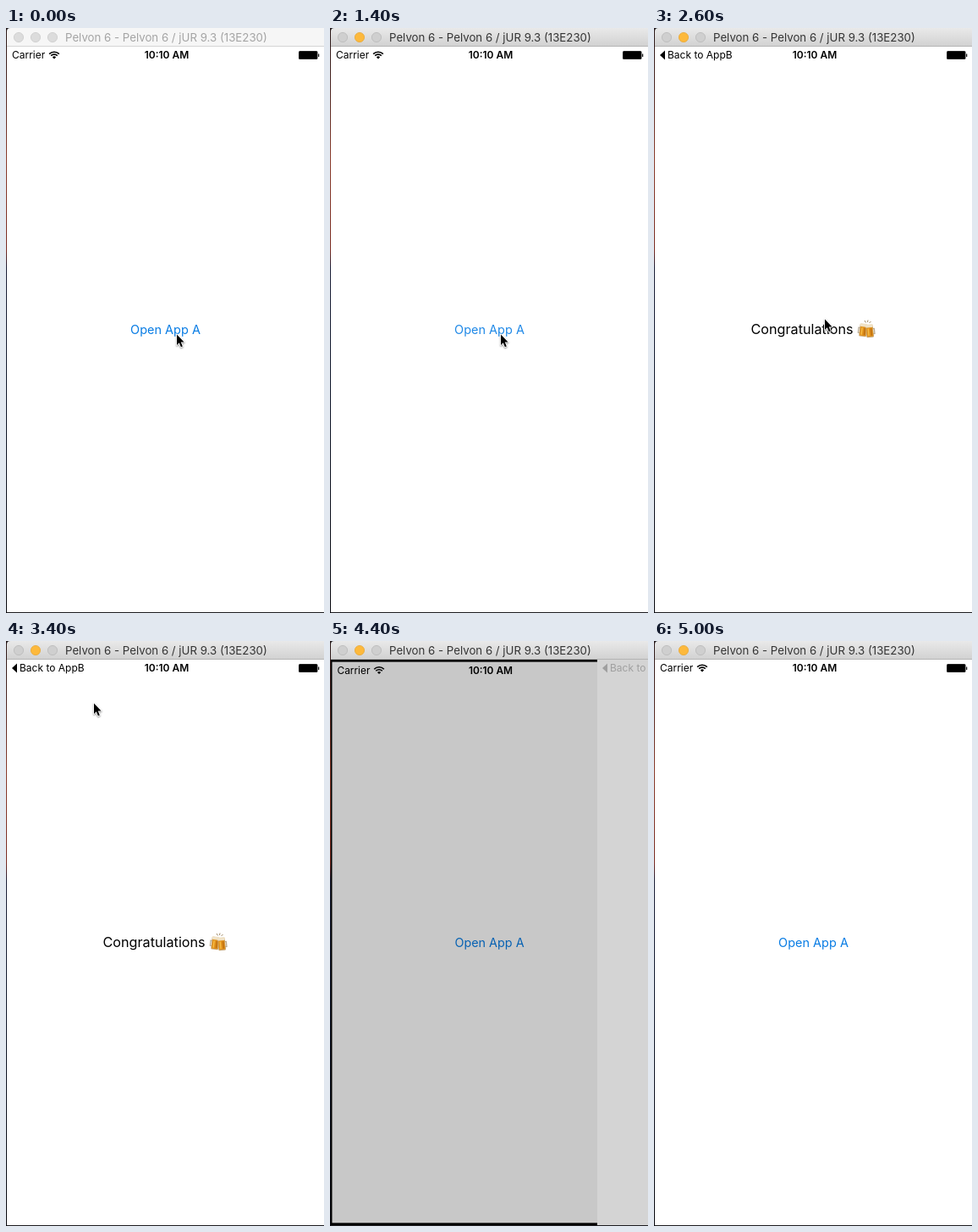
An HTML page with a canvas that plays this animation: 376x690 px, repeating every 5100 ms.

```html
<!DOCTYPE html>
<html lang="en">
<head>
<meta charset="utf-8">
<title>App switch</title>
<style>
  html, body { margin: 0; width: 100%; height: 100%; overflow: hidden; background: #fff; }
  canvas { display: block; width: 376px; height: 690px; }
</style>
</head>
<body>
<canvas id="stage" width="376" height="690"></canvas>
<script>
const ctx = document.getElementById('stage').getContext('2d');
const LOOP = 5100, STEP = 100;
const SCREEN = { x: 1, y: 22, w: 375, h: 667 };
const BLUE = '#087ce4';

// Pointer tip: time, x, y
const POINTER_PATH = [
  [2500, 202, 360], [2600, 202, 342], [2850, 190, 230],
  [3100, 160, 133], [3400, 104, 72], [3700, 48, 35]
];

const clamp = v => Math.max(0, Math.min(1, v));
const mix = (a, b, k) => a + (b - a) * k;

// Share of the way still to go in a critically damped spring
const springLeft = ms => {
  const wt = ms / 1000 * 18.3;
  return (1 + wt) * Math.exp(-wt);
};

function rect(x, y, w, h, color) {
  ctx.fillStyle = color;
  ctx.fillRect(x, y, w, h);
}

function fillScreen(color) {
  rect(SCREEN.x, SCREEN.y, SCREEN.w, SCREEN.h, color);
}

function text(str, x, y, size, color, weight = 400, align = 'left') {
  ctx.font = `${weight} ${size}px Inter, "Open Sans", sans-serif`;
  ctx.textAlign = align;
  ctx.fillStyle = color;
  ctx.fillText(str, x, y);
}

function polygon(points, color) {
  ctx.beginPath();
  points.forEach(([x, y]) => ctx.lineTo(x, y));
  ctx.closePath();
  ctx.fillStyle = color;
  ctx.fill();
}

function roundBox(x, y, w, h, r, color) {
  ctx.beginPath();
  ctx.roundRect(x, y, w, h, r);
  ctx.fillStyle = color;
  ctx.fill();
}

function withAlpha(alpha, draw) {
  ctx.save();
  ctx.globalAlpha = alpha;
  draw();
  ctx.restore();
}

function desktop() {
  const g = ctx.createLinearGradient(0, 0, 0, 690);
  [[0, '#2a1a1a'], [.1, '#4a2420'], [.22, '#8a3c2c'], [.38, '#7a2c22'],
   [.41, '#1c2038'], [.6, '#10182c'], [1, '#08080e']].forEach(s => g.addColorStop(...s));
  rect(0, 0, 376, 690, '#1c1c20');
  rect(0, 0, 1, 690, g);
}

function titleBar(active) {
  let fill = '#f6f6f6';
  if (active) {
    fill = ctx.createLinearGradient(0, 0, 0, 21);
    fill.addColorStop(0, '#e9e9e9');
    fill.addColorStop(1, '#d2d2d2');
  }
  roundBox(1, 0, 380, 22, [4, 0, 0, 0], fill);
  rect(1, 21, 375, 1, active ? '#b4b4b4' : '#d4d4d4');

  [15, 35, 55].forEach((x, i) => {
    const lit = active && i === 1;
    ctx.beginPath();
    ctx.arc(x, 11, 5.6, 0, 7);
    ctx.fillStyle = lit ? '#fdb93c' : active ? '#cfcfcf' : '#dcdcdc';
    ctx.fill();
    ctx.lineWidth = .8;
    ctx.strokeStyle = lit ? '#e8a835' : active ? '#b9b9b9' : '#cbcbcb';
    ctx.stroke();
  });
  text('Pelvon 6 - Pelvon 6 / jUR 9.3 (13E230)', 70, 16, 13.25, active ? '#343434' : '#a4a4a4');
}

function wifi(x, y) {
  ctx.strokeStyle = '#000';
  ctx.lineWidth = 1.6;
  [8.3, 5.4].forEach(r => {
    ctx.beginPath();
    ctx.arc(x, y, r, -Math.PI * .75, -Math.PI * .25);
    ctx.stroke();
  });
  ctx.beginPath();
  ctx.moveTo(x, y);
  ctx.arc(x, y, 3, -Math.PI * .75, -Math.PI * .25);
  ctx.fillStyle = '#000';
  ctx.fill();
}

function battery() {
  roundBox(346, 27, 22.5, 10, 1.5, '#222');
  rect(347, 28, 20.5, 8, '#000');
  rect(369, 30.5, 1.3, 3.5, '#222');
}

function mug(x, y, tilt, side) {
  ctx.save();
  ctx.translate(x, y);
  ctx.rotate(tilt);
  ctx.strokeStyle = '#b9ab94';
  ctx.lineWidth = 1.3;
  ctx.strokeRect(side < 0 ? -5.6 : 3, -2, 2.6, 6);
  roundBox(-4.4, -7, 8.8, 15, 1.3, '#c9a878');
  rect(-3.6, -4, 7.2, 11, '#e0901a');
  rect(-2.2, -2.5, 1.3, 8.5, '#f8bf48');
  rect(1.2, -2.5, 1.3, 8.5, '#b96a10');
  roundBox(-4.5, -7.5, 9, 3.8, 1.6, '#f0e2c6');
  ctx.restore();
}

function beers() {
  mug(247.4, 356, .12, -1);
  mug(255, 357, -.1, 1);
  ctx.strokeStyle = '#a08a66';
  ctx.lineWidth = 1;
  ctx.beginPath();
  [[250.5, 347.5, 249, 345], [252.5, 347, 253, 344.5], [254.5, 348, 256.5, 346]].forEach(([a, b, c, d]) => {
    ctx.moveTo(a, b);
    ctx.lineTo(c, d);
  });
  ctx.stroke();
}

function page() {
  fillScreen('#fff');
  text('10:10 AM', 190, 36, 12, '#000', 600, 'center');
  battery();
}

function launcher(buttonAlpha) {
  page();
  text('Carrier', 7, 36, 12, '#000');
  wifi(57, 36.5);
  withAlpha(buttonAlpha, () => text('Open App A', 188.5, 361, 14.5, BLUE, 400, 'center'));
}

function greeting(backAlpha, bodyAlpha) {
  page();
  withAlpha(backAlpha, () => {
    polygon([[7, 32], [13, 26.5], [13, 37.5]], '#000');
    text('Back to AppB', 16, 36, 12, '#000');
  });
  withAlpha(bodyAlpha, () => {
    text('Congratulations', 114.5, 361, 16.2, '#000');
    beers();
  });
}

const dim = amount => fillScreen(`rgba(0,0,0,${amount})`);

// cover: 0 shows the launcher, 1 shows the greeting
function transition(cover, buttonAlpha, backAlpha, bodyAlpha) {
  const { x, y, w, h } = SCREEN;
  const cx = x + w / 2, cy = y + h / 2, scale = 1 - .05 * cover;
  fillScreen('#000');
  ctx.save();
  ctx.translate(cx, cy);
  ctx.scale(scale, scale);
  ctx.translate(-cx, -cy);
  launcher(buttonAlpha);
  ctx.restore();
  dim(1 - Math.pow(1 - cover, 1.4));
  ctx.save();
  ctx.translate(Math.round((1 - cover) * w), 0);
  greeting(backAlpha, bodyAlpha);
  dim(.2 * (1 - cover));
  ctx.restore();
}

function pointerAt(t) {
  const path = POINTER_PATH, last = path[path.length - 1];
  if (t <= path[0][0]) return path[0].slice(1);
  if (t >= last[0]) return last.slice(1);
  const i = path.findIndex(p => p[0] > t);
  const a = path[i - 1], b = path[i], k = (t - a[0]) / (b[0] - a[0]);
  return [mix(a[1], b[1], k), mix(a[2], b[2], k)];
}

function pointer([x, y]) {
  ctx.save();
  ctx.translate(Math.round(x), Math.round(y) + 1.5);
  ctx.shadowColor = 'rgba(0,0,0,.35)';
  ctx.shadowBlur = 2;
  ctx.shadowOffsetY = 1;
  const arrow = [[0, 0], [0, 12.4], [2.8, 9.8], [4.9, 14.7], [6.8, 13.9], [4.8, 9.1], [8.6, 8.9]];
  polygon(arrow, '#000');
  ctx.strokeStyle = '#fff';
  ctx.lineWidth = 1.8;
  ctx.lineJoin = 'round';
  ctx.stroke();
  ctx.shadowColor = 'transparent';
  polygon(arrow, '#000');
  ctx.restore();
}

function buttonAlphaAt(t) {
  if (t < 1000) return 1;
  if (t < 1600) return mix(.2, .9, clamp((t - 1000) / 400));
  return t < 4800 ? .93 : mix(.93, 1, clamp((t - 4700) / 300));
}

function draw(t) {
  const button = buttonAlphaAt(t);
  const back = mix(1, .25, clamp((t - 3700) / 300));
  const body = clamp((t - 2100) / 200);
  desktop();
  if (t < 1600 || t >= 4800) launcher(button);
  else if (t < 2200) transition(1 - springLeft(t - 1441), button, 1, 0);
  else if (t < 4400) greeting(back, body);
  else transition(springLeft(t - 4220), 1, back, 1);
  titleBar(t >= 900);
  if (t < 4200) pointer(pointerAt(t));
}

function tick(now) {
  draw(Math.floor(now % LOOP / STEP) * STEP);
  requestAnimationFrame(tick);
}
requestAnimationFrame(tick);
</script>
</body>
</html>
```
